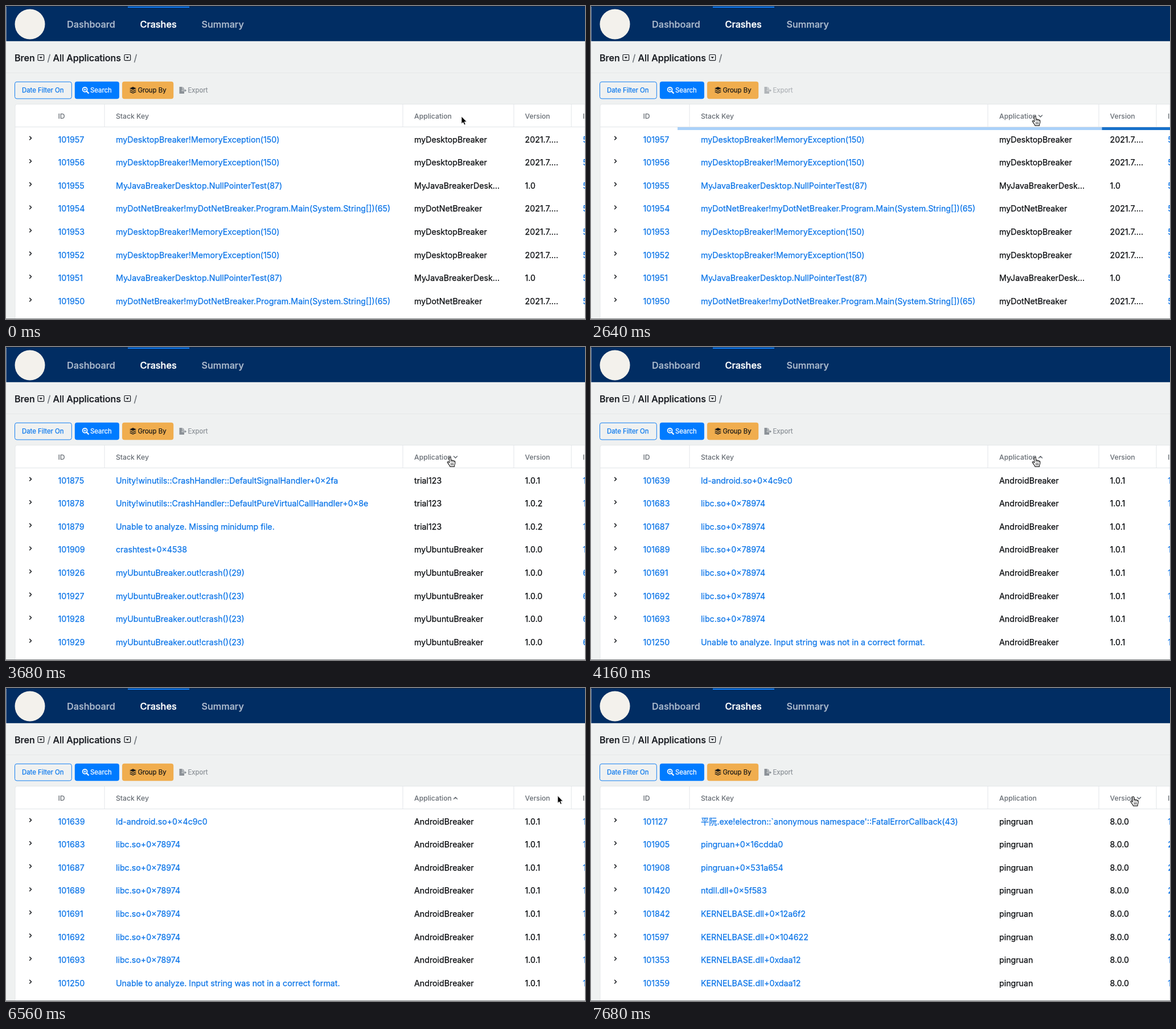
These frames come from a looping animation (1017 by 550 pixels, 8 s). An HTML page:

```html
<!DOCTYPE html>
<html lang="en">
<head>
<meta charset="utf-8">
<title>Crash list sorting</title>
<style>
  html, body { margin: 0; width: 100%; height: 100%; overflow: hidden; background: #eff1f1; }
  svg { display: block; width: 100vw; height: 100vh; font: 400 14.22px Inter, "Noto Sans CJK SC", "Noto Sans CJK", sans-serif; }
  /* a hairline in the text colour gives the slightly heavier strokes */
  text { white-space: pre; fill: currentColor; stroke: currentColor; stroke-width: .25px; }
  .nav { font-size: 16.25px; font-weight: 500; color: #b0bdcf; }
  .nav .on { color: #fff; stroke-width: .4px; }
  .crumb { font-size: 16.1px; font-weight: 500; color: #16191f; }
  .crumb .sep { font-weight: 400; color: #6a7077; }
  .btn { font-size: 11.37px; }
  .head { font-size: 12.19px; font-weight: 500; color: #666c73; }
  .head text { stroke: none; }
  .link { color: #0a74e8; }
  .cell { color: #0b0d10; }
  .line { fill: none; stroke-linecap: round; stroke-linejoin: round; }
</style>
</head>
<body>
<svg viewBox="0 0 1017 550" preserveAspectRatio="none">
  <rect width="1017" height="550" fill="#eff1f1"/>
  <rect x=".5" width="1016.5" height="61.8" fill="#012d63"/>
  <path d="M0 .5H1017" stroke="#0b2244" fill="none"/>
  <rect x="214" y=".9" width="108" height="2.1" fill="#0f7cf5"/>
  <circle cx="42" cy="32" r="26.5" fill="#f3f1ec"/>
  <g class="nav">
    <text x="107" y="37.6">Dashboard</text>
    <text x="235.5" y="37.6" class="on">Crashes</text>
    <text x="343.5" y="37.6">Summary</text>
  </g>

  <g class="crumb">
    <text x="15" y="97.3">Bren</text>
    <text x="72.5" y="97.3" class="sep">/</text>
    <text x="82.5" y="97.3">All Applications</text>
    <text x="224.5" y="97.3" class="sep">/</text>
  </g>
  <g id="boxes"></g>
  <rect y="117" width="1017" height="1" fill="#e5e8e9"/>

  <g class="btn">
    <rect x="15.5" y="133.3" width="99.8" height="29.6" rx="3.5" fill="none" stroke="#1580f2"/>
    <text x="28" y="152.2" color="#0a78ee">Date Filter On</text>
    <rect x="120.8" y="132.8" width="78.1" height="30.5" rx="4" fill="#007bff"/>
    <g class="line" stroke="#fff">
      <circle cx="138.6" cy="146.8" r="4" stroke-width="1.7"/>
      <path d="M141.8 150L144.8 153" stroke-width="2.2"/>
      <path d="M136.8 146.8H140.4M138.6 145V148.6" stroke-width="1.1"/>
    </g>
    <text x="148" y="152.2" color="#fff">Search</text>
    <rect x="204" y="132.8" width="90.2" height="30.5" rx="4" fill="#f0ad4e"/>
    <g fill="#1d1c19">
      <path d="M223 142L229 144.8 223 147.6 217 144.8Z"/>
      <path d="M218.4 147L223 149.2 227.6 147 229 147.8 223 150.7 217 147.8Z"/>
      <path d="M218.4 150.1L223 152.3 227.6 150.1 229 150.9 223 153.8 217 150.9Z"/>
    </g>
    <text x="231.5" y="152.2" color="#1d1c19">Group By</text>
    <g id="export" fill="currentColor">
      <path d="M304.5 142H309.5V145.5H313V147.2H308.8V149.6H313V154H304.5Z"/>
      <path d="M310.4 142L313 144.7H310.4Z"/>
      <path d="M309.5 147.9H313.8V146L317.2 148.5 313.8 151V149.1H309.5Z"/>
      <text x="319.5" y="152.2">Export</text>
    </g>
  </g>

  <path d="M16 550V176Q16 172.5 19.5 172.5H1017V550Z" fill="#fff" stroke="#e4e7e9"/>
  <path d="M16 212.5H1017M173 173V212M697 173V212M892 173V212M993 173V212" stroke="#e2e5e8"/>
  <g class="head">
    <text x="91.5" y="198">ID</text>
    <text x="193" y="198">Stack Key</text>
    <text x="717" y="198">Application</text>
    <text x="911.5" y="198">Version</text>
    <text x="1013" y="198">I</text>
  </g>
  <path id="caret" class="line" stroke="#62686f" stroke-width="1.5"/>

  <g id="rows"></g>

  <g id="loader">
    <rect x="152" y="213" width="865" height="5" fill="rgb(170,209,249)"/>
    <rect id="bar" y="213" height="5" fill="rgb(16,108,200)"/>
  </g>
  <rect y="549" width="1017" height="1" fill="#7d7f82"/>

  <path id="arrow" d="M0 0V13L3 10.4 5 15 7.2 14.1 5.2 9.6H9.3Z" fill="#000" stroke="#fff" stroke-width=".8"/>
  <g id="hand" class="line" stroke="#111" stroke-width="1.1">
    <path fill="#fff" d="M-1.6 1.6C-1.6-.3 1.2-.3 1.3 1.6L1.6 6C2 5 4 5 4.2 6.4C4.8 5.6 6.5 5.8 6.8 7.1C7.6 6.6 8.9 7 8.9 8.5C9 11 8.8 12.5 7.7 14.2L7.5 16.6H-.2L-.6 15.2C-1.8 13.4-3 11.5-4.5 9.7C-5.2 8.5-3.9 7.5-2.8 8.4L-1.3 9.8Z"/>
    <path d="M1.6 6V8.4M4.2 6.6V8.6M6.8 7.3V9M1.6 10.6V14M3.6 10.6V14M5.6 10.6V14" stroke-width=".8"/>
  </g>
</svg>
<script>
const $ = id => document.getElementById(id);
const LOOP = 8000, TICK = 80;

// Row: id, stack key, application, version, first digit of the cut-off column
const memory = id => [id, 'myDesktopBreaker!MemoryException(150)', 'myDesktopBreaker', '2021.7.…', 5];
const java = id => [id, 'MyJavaBreakerDesktop.NullPointerTest(87)', 'MyJavaBreakerDesk…', '1.0', 5];
const dotnet = id => [id, 'myDotNetBreaker!myDotNetBreaker.Program.Main(System.String[])(65)', 'myDotNetBreaker', '2021.7.…', 5];
const trial = (id, key, ver) => [id, key, 'trial123', ver, 1];
const ubuntu = (id, key, n) => [id, key, 'myUbuntuBreaker', '1.0.0', n];
const ubuntuOut = (id, line) => ubuntu(id, `myUbuntuBreaker.out!crash()(${line})`, 6);
const android = (id, key = 'libc.so+0x78974') => [id, key, 'AndroidBreaker', '1.0.1', 1];
const ping = (id, key, n) => [id, key, 'pingruan', '8.0.0', n];

const pages = [
  { from: 0, rows: [memory(101957), memory(101956), java(101955), dotnet(101954),
    memory(101953), memory(101952), java(101951), dotnet(101950)] },
  { from: 3040, rows: [
    trial(101875, 'Unity!winutils::CrashHandler::DefaultSignalHandler+0x2fa', '1.0.1'),
    trial(101878, 'Unity!winutils::CrashHandler::DefaultPureVirtualCallHandler+0x8e', '1.0.2'),
    trial(101879, 'Unable to analyze. Missing minidump file.', '1.0.2'),
    ubuntu(101909, 'crashtest+0x4538', 1),
    ubuntuOut(101926, 29), ubuntuOut(101927, 23), ubuntuOut(101928, 23), ubuntuOut(101929, 23)] },
  { from: 4160, rows: [
    android(101639, 'ld-android.so+0x4c9c0'),
    ...[101683, 101687, 101689, 101691, 101692, 101693].map(id => android(id)),
    android(101250, 'Unable to analyze. Input string was not in a correct format.')] },
  { from: 7600, rows: [
    ping(101127, "平阮.exe!electron::`anonymous namespace'::FatalErrorCallback(43)", 1),
    ping(101905, 'pingruan+0x16cdda0', 2),
    ping(101908, 'pingruan+0x531a654', 2),
    ping(101420, 'ntdll.dll+0x5f583', 2),
    ping(101842, 'KERNELBASE.dll+0x12a6f2', 2),
    ping(101597, 'KERNELBASE.dll+0x104622', 2),
    ping(101353, 'KERNELBASE.dll+0xdaa12', 1),
    ping(101359, 'KERNELBASE.dll+0xdaa12', 1)] },
];

// show and hide bound the loader; start is where its animation began
const loads = [
  { start: 2615, show: 2640, hide: 3040 },
  { start: 3735, show: 3760, hide: 4160 },
  { start: 6967, show: 7040, hide: 7600 },
];

const carets = [
  { from: 2640, x: 789.5, up: false },
  { from: 3760, x: 789.5, up: true },
  { from: 7040, x: 962.6, up: false },
];

// Pointer: time, x, y, hand
const moves = [
  [0, 800, 194, 0], [80, 800, 194, 0], [640, 790, 195, 0], [2240, 790, 195, 0],
  [2320, 783, 194, 1], [2400, 780, 193.5, 1], [6000, 780, 193.5, 1],
  [6080, 830, 190, 0], [6160, 930, 186, 0], [6240, 977, 188, 0], [6400, 977, 188, 0],
  [6640, 965, 190, 0], [6720, 957, 190, 1], [6880, 952.5, 190.5, 1], [LOOP, 952.5, 190.5, 1],
];

const columns = [[91.5, 'link'], [193, 'link'], [717, 'cell'], [911.5, 'cell'], [1013.3, 'link']];

// The typeface shows an x between two digits as a multiplication sign
const timesSign = s => String(s).replace(/(\d)x(?=\d)/g, '$1×');

function rowMarkup(row, i) {
  const y = 239.6 + i * 40.58;
  const cells = row.map((s, c) =>
    `<text x="${columns[c][0]}" y="${y}" class="${columns[c][1]}">${timesSign(s)}</text>`);
  return `<path class="line" stroke="#15181c" stroke-width="1.5" d="M41.6 ${y - 10.4}l2.9 2.9-2.9 2.9"/>` + cells.join('');
}

$('rows').innerHTML = pages.map(p => `<g>${p.rows.map(rowMarkup).join('')}</g>`).join('');
$('boxes').innerHTML = [56, 208].map(x =>
  `<rect x="${x}" y="85.5" width="10.6" height="10.2" rx="1.2" fill="none" stroke="#16191f" stroke-width="1.2"/>
   <path d="M${x + 2.5} 89.3h5.6l-2.8 3.2z" fill="#16191f"/>`).join('');

const groups = [...$('rows').children];
const latest = (list, t) => list.filter(e => e.from <= t).pop();
const show = (el, on) => el.setAttribute('visibility', on ? 'visible' : 'hidden');

function drawLoader(t) {
  const load = loads.find(l => t >= l.show && t < l.hide);
  show($('loader'), load);
  $('export').setAttribute('color', load ? '#b0b4b8' : '#8b9197');
  if (!load) return;
  // A shrinking, fading bar that sweeps left with an ease-out sine
  const left = 1 - Math.sin((t - load.start) % 800 / 800 * Math.PI / 2);
  const span = 1120 * left;
  $('bar').setAttribute('x', 152 + 0.7 * span);
  $('bar').setAttribute('width', 0.3 * span);
  $('bar').setAttribute('opacity', left);
}

function drawCaret(t) {
  const c = latest(carets, t);
  show($('caret'), c);
  if (c) $('caret').setAttribute('d', c.up ? `M${c.x - 3} 195l3-3 3 3` : `M${c.x - 3} 192l3 3 3-3`);
}

function drawPointer(t) {
  const i = moves.findIndex(m => m[0] > t) - 1;
  const [t0, x0, y0, hand] = moves[i], [t1, x1, y1] = moves[i + 1];
  const k = (t - t0) / (t1 - t0);
  const el = $(hand ? 'hand' : 'arrow');
  show($('hand'), hand);
  show($('arrow'), !hand);
  el.setAttribute('transform', `translate(${x0 + (x1 - x0) * k} ${y0 + (y1 - y0) * k})`);
}

function draw(t) {
  const page = pages.indexOf(latest(pages, t));
  groups.forEach((g, i) => show(g, i === page));
  drawLoader(t);
  drawCaret(t);
  drawPointer(t);
}

const begin = performance.now();
function frame() {
  const t = (performance.now() - begin) % LOOP;
  draw(Math.floor(t / TICK) * TICK);
  requestAnimationFrame(frame);
}
frame();
</script>
</body>
</html>
```
